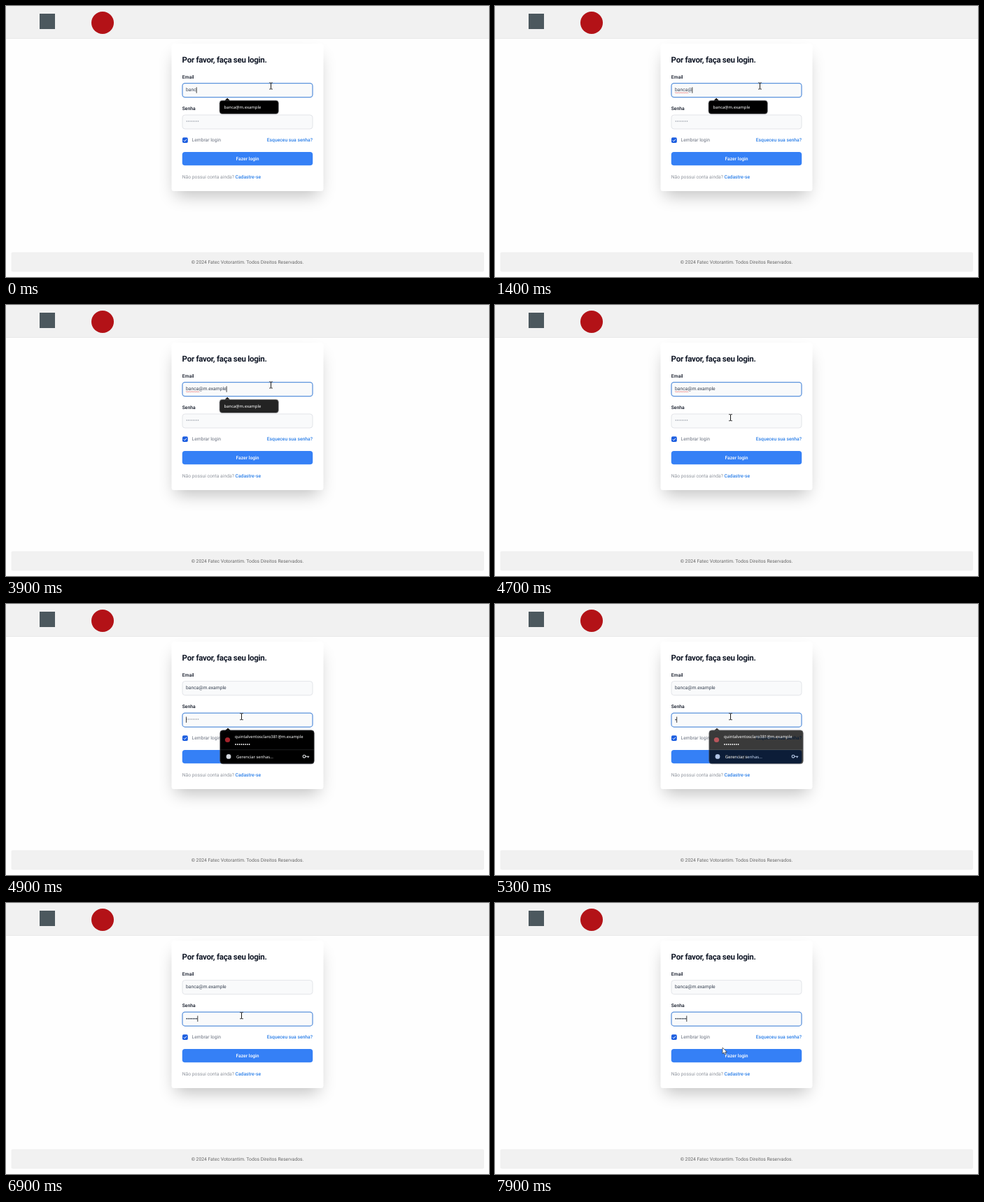
An HTML page that plays this animation: 690x388 px, repeating every 8000 ms.

```html
<!DOCTYPE html>
<html lang="pt-BR">
<head>
<meta charset="utf-8">
<title>Login</title>
<style>
  html, body { margin: 0; width: 100%; height: 100%; overflow: hidden; background: #fefefe; }
  svg { display: block; width: 690px; height: 388px; }
  text { font: 400 6.76px Roboto, sans-serif; fill: #111827; text-rendering: geometricPrecision; }
  .med { font-weight: 500; }
  .title { font-weight: 700; font-size: 11.55px; letter-spacing: -.025em; }
  .gray { fill: #6b7280; }
  .link { fill: #2b7fe8; font-weight: 500; }
  .field { fill: #f9fafb; stroke: #dcdfe4; stroke-width: .8; }
  .field.on { stroke: #5a92dc; stroke-width: 1.25; }
  .pop text { font: 400 5.9px "Noto Sans", sans-serif; fill: #fff; }
  .pop .box { fill: #000; stroke: #8d8f93; stroke-width: .7; }
  #passPop .box { stroke: #4c4e52; }
</style>
</head>
<body>
<svg viewBox="0 0 690 388">
  <defs>
    <filter id="blur" x="-30%" y="-30%" width="160%" height="160%"><feGaussianBlur stdDeviation="12"/></filter>
  </defs>

  <rect width="690" height="46.4" fill="#f1f1f1"/>
  <rect y="46" width="690" height=".8" fill="#e6e6e6"/>
  <rect x="48" y="11" width="22" height="22" fill="#4c585e"/>
  <circle cx="138" cy="24" r="16" fill="#b31217"/>

  <rect x="242" y="72" width="205" height="199" fill="#000" opacity=".25" filter="url(#blur)"/>
  <rect x="236.5" y="54" width="217" height="211" rx="3.5" fill="#fff"/>
  <text class="title" x="251.6" y="81.2">Por favor, faça seu login.</text>

  <text class="med" x="251.8" y="103.7">Email</text>
  <rect class="field" id="mailBox" x="252" y="110.6" width="186" height="20" rx="3.8"/>
  <text id="mail" x="257" y="122.4" style="fill:#374151"></text>
  <path id="wavy" fill="none" stroke="#e04040" stroke-width=".6"/>

  <text class="med" x="251.8" y="149.1">Senha</text>
  <rect class="field" id="passBox" x="252" y="156" width="186" height="20" rx="3.8"/>
  <g id="hint" fill="#858c98"></g>
  <g id="dots" fill="#1f2937"></g>
  <rect id="caret" width=".8" height="8.4" fill="#111"/>

  <rect x="252" y="188.3" width="7.8" height="7.8" rx="1.8" fill="#1c5ee0"/>
  <path d="M253.9 192.3l1.4 1.5 2.7-3" fill="none" stroke="#fff" stroke-width="1"/>
  <text class="gray" x="265.5" y="194.3">Lembrar login</text>
  <text class="link" x="438" y="194.3" text-anchor="end">Esqueceu sua senha?</text>

  <rect x="251.8" y="208.9" width="186.4" height="19.3" rx="3.8" fill="#3580f6"/>
  <text class="med" x="345" y="220.6" text-anchor="middle" style="fill:#fff">Fazer login</text>
  <text x="251.8" y="246.7" style="fill:#8f949d">Não possui conta ainda? <tspan class="link">Cadastre-se</tspan></text>

  <rect x="7.5" y="352.6" width="675.5" height="28" rx="2" fill="#f1f1f1"/>
  <text x="345" y="369.2" text-anchor="middle" style="fill:#686868">© 2024 Fatec Votorantim. Todos Direitos Reservados.</text>

  <g class="pop" id="mailPop">
    <rect class="box" x="305" y="135.2" width="84.4" height="19.4" rx="4"/>
    <path d="M312.5 135.4l3.7-3.6 3.7 3.6z"/>
    <text id="mailTip" x="311.6" y="146.7"></text>
  </g>

  <g class="pop" id="passPop">
    <rect class="box" x="305.8" y="180.8" width="134.4" height="48" rx="4"/>
    <path d="M313.3 181l3.7-3.6 3.7 3.6z"/>
    <rect x="306" y="208.6" width="134" height=".5" fill="#3a3d42"/>
    <circle cx="316.5" cy="194.5" r="3.6" fill="#a3232b"/>
    <text x="327" y="191.5">quintalventosclaro381@m.example</text>
    <g id="tipDots" fill="#fff"></g>
    <circle cx="318" cy="218.4" r="3.4" fill="#d5d9df"/>
    <text x="329" y="220.5">Gerenciar senhas...</text>
    <g fill="none" stroke="#e3e5e8" stroke-width="1.1">
      <circle cx="426" cy="218.2" r="1.9"/>
      <path d="M428 218.2h5.2M431.6 218.2v2"/>
    </g>
  </g>

  <path id="beam" d="M-2.4-4.6h1.7q.7 0 .7.6V3.8q0 .6-.7.6h-1.7M2.4-4.6H.7Q0-4.6 0-4V3.8q0 .6 .7.6h1.7" fill="none" stroke="#1a1a1a" stroke-width=".9"/>
  <path id="arrow" d="M0 0V8.8L2.1 6.9 3.5 10 5 9.3 3.7 6.3H6.4z" fill="#fff" stroke="#333" stroke-width=".7"/>
</svg>
<script>
  const LOOP = 8000, STEP = 100, FOCUS = 4800;
  const MAIL = 'banca@m.example';
  const $ = id => document.getElementById(id);

  // Tables of [time, value]
  const mailKeys = [[0, 4], [100, 5], [1400, 6], [1800, 7], [2100, 8], [2300, 9], [2400, 10],
    [2500, 11], [3500, 12], [3600, 13], [3700, 14], [3900, 15]];
  const passKeys = [[FOCUS, 0], [5300, 1], [5800, 2], [5900, 3], [6000, 4], [6100, 5], [6500, 6], [6900, 7]];
  const mailFade = [[0, 1], [3900, .86], [4000, .4], [4100, 0]];
  const passFade = [[0, 0], [4800, .45], [4900, 1], [5300, .77], [5400, .35], [5500, 0]];
  const moves = [
    { from: 4300, to: 4700, a: [378.5, 114.6], b: [336.5, 161.3] },
    { from: 7300, to: 7900, a: [336.5, 161.3], b: [325, 207] }
  ];

  const last = (table, t) => table.reduce((hit, row) => row[0] <= t ? row : hit, table[0]);
  const ease = p => p * p * (3 - 2 * p);
  const show = (el, on) => { el.style.display = on ? '' : 'none'; };

  function addDots(id, n, x, y, gap, r) {
    for (let i = 0; i < n; i++) {
      const c = document.createElementNS('http://www.w3.org/2000/svg', 'circle');
      c.setAttribute('cx', x + i * gap);
      c.setAttribute('cy', y);
      c.setAttribute('r', r);
      $(id).append(c);
    }
  }
  addDots('hint', 8, 258.2, 165, 2.35, .65);
  addDots('dots', 7, 258.2, 165.6, 2.35, .85);
  addDots('tipDots', 8, 328, 201, 2.8, .9);
  $('mailTip').textContent = MAIL;
  $('wavy').setAttribute('d', 'M257 124.2' + 'q.6-1 1.2 0t1.2 0'.repeat(8));

  function pointer(t) {
    const m = t < moves[1].from ? moves[0] : moves[1];
    const p = ease(Math.min(1, Math.max(0, (t - m.from) / (m.to - m.from))));
    return m.a.map((v, i) => v + (m.b[i] - v) * p);
  }

  function draw(t) {
    const onPass = t >= FOCUS;
    const [mailTime, mailLen] = last(mailKeys, t);
    const [passTime, passLen] = last(passKeys, t);

    $('mail').textContent = MAIL.slice(0, mailLen);
    show($('wavy'), t >= 1100 && !onPass);
    show($('hint'), !passLen);
    [...$('dots').children].forEach((dot, i) => show(dot, i < passLen));
    $('mailBox').classList.toggle('on', !onPass);
    $('passBox').classList.toggle('on', onPass);

    const caretX = onPass ? 257 + passLen * 2.35 : 257 + $('mail').getComputedTextLength();
    $('caret').setAttribute('x', caretX);
    $('caret').setAttribute('y', onPass ? 161.5 : 116.3);
    show($('caret'), (t - (onPass ? passTime : mailTime)) % 1000 < 500);

    $('mailPop').style.opacity = last(mailFade, t)[1];
    $('passPop').style.opacity = last(passFade, t)[1];

    const [x, y] = pointer(t);
    const inField = y < 131 || (y > 156 && y < 176);
    show($('beam'), inField);
    show($('arrow'), !inField);
    $(inField ? 'beam' : 'arrow').setAttribute('transform', `translate(${x} ${y})`);
  }

  const start = performance.now();
  function tick() {
    const t = (performance.now() - start) % LOOP;
    draw(Math.floor(t / STEP) * STEP);
    requestAnimationFrame(tick);
  }
  tick();
</script>
</body>
</html>
```
